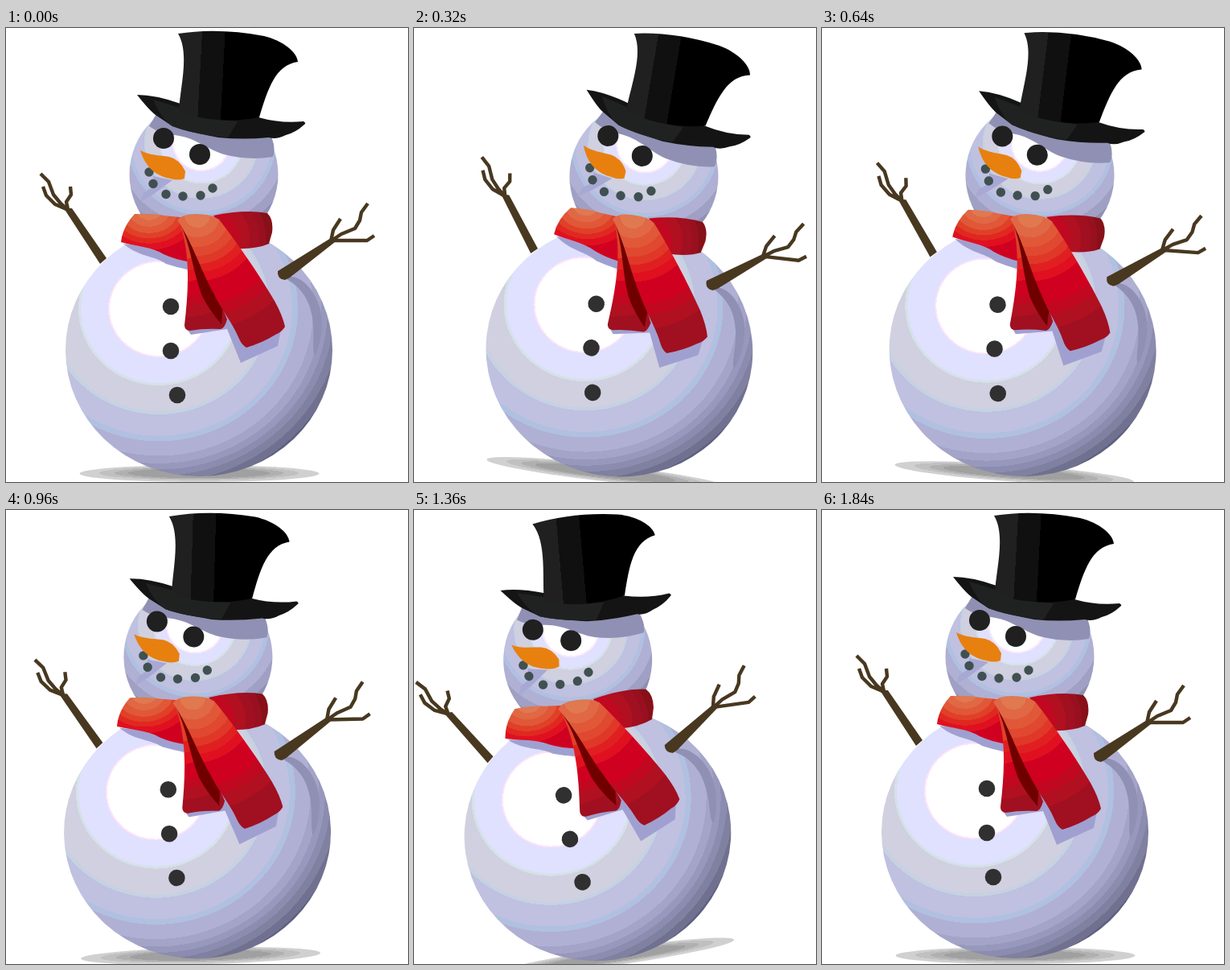
Write an HTML page that moves like this. It is 500 px wide and 564 px high and loops after 1.92 s.

```html
<!DOCTYPE html>
<html lang="en">
<head>
<meta charset="utf-8">
<title>Rocking snowman</title>
<style>
html, body { margin: 0; width: 100%; height: 100%; overflow: hidden; background: #fff; }
svg { display: block; width: 500px; height: 564px; }
.twig { fill: none; stroke: #483820; stroke-width: 4.4; stroke-linejoin: round; }
</style>
</head>
<body>
<svg viewBox="0 0 500 564">
  <defs id="defs">
    <linearGradient id="felt" gradientUnits="userSpaceOnUse" x1="213" y1="50" x2="363" y2="58">
      <stop offset=".19" stop-color="#202020"/><stop offset=".19" stop-color="#101010"/>
      <stop offset=".38" stop-color="#101010"/><stop offset=".38" stop-color="#000"/>
    </linearGradient>
  </defs>
  <g id="snowman">
    <ellipse cx="240.500" cy="553.500" rx="149" ry="10.500" fill="url(#ground)"/>

    <g id="body">
      <ellipse cx="240" cy="400" rx="166" ry="157" fill="url(#snow)"/>
      <path fill="#9090b4" d="M345 310C362 303 384 322 391 350C395 372 391 395 384 407C380 400 385 375 380 355C376 333 362 318 345 310Z"/>
      <path fill="#a0a0d0" d="M146 268C166 285 183 282 199 293Q211 297 226 300L240 280ZM222 370L230 381L275 374L292 416L338 395L342 374L270 340Z"/>
    </g>

    <g id="arms" fill="#483820">
      <path d="M117 293L125 286L82 224L72 224Z"/>
      <path class="twig" d="M77 226L68 218L59 207L53 191L43 181M75 225L61 219L50 208L46 197M77 225L75 216L81 207L80 197"/>
      <path d="M338 302Q337 312 347 313L353 310L409 266L404 261Z"/>
      <path class="twig" d="M404 265L407 251L416 237M405 264L417 256L434 249L440 239L442 229L450 218M406 264L449 264L458 258"/>
    </g>

    <g id="head">
      <circle cx="246" cy="182" r="92.500" fill="url(#face)"/>
      <path fill="#9090b4" d="M188 105L178 122Q190 131 210 133C236 136 250 151 271 157Q302 165 332 160Q336 150 330 135Z"/>
      <path fill="#a8a8d4" d="M183 184L207 189L184 206L167 216L171 205L183 197Z"/>
      <g id="coal"></g>
      <path fill="#e88010" d="M167 152C178 158 190 158 203 160Q216 163 223 178L222 187Q214 190 204 187C184 183 173 171 167 152Z"/>
    </g>

    <g id="hat">
      <path fill="#141414" d="M163 83Q186 83 217 94L314 111Q342 119 370 116Q374 118 371 120Q360 130 348 133Q336 139 327 136Q294 139 264 136Q226 129 207 122L186 108Q178 102 163 83Z"/>
      <path fill="#202222" d="M183 89L216 99Q236 111 288 116L276 136Q232 132 207 122Q193 113 183 89Z"/>
      <path fill="url(#felt)" d="M214 7Q264-1 321 10C345 16 362 30 363 42C335 46 326 75 315 111Q262 121 215 104C216 76 229 32 214 7Z"/>
    </g>

    <g id="scarf">
      <path fill="url(#wrap)" d="M258 233Q296 225 325 230Q333 238 331 254L327 268Q311 275 285 274Z"/>
      <path fill="url(#collar)" d="M160 231Q183 230 197 233L226 236L231 291Q211 288 196 281C182 272 160 271 143 266Q145 247 160 231Z"/>
      <path fill="url(#under)" d="M215 240L234 262L275 362Q272 373 267 374Q246 373 229 376Q222 376 222 369C227 326 230 280 215 240Z"/>
      <path fill="#700000" d="M213 238C229 261 231 300 244 333Q253 351 268 368L270 338L238 264Z"/>
      <path fill="url(#tail)" d="M213 239Q219 231 236 231Q256 231 265 238C285 263 316 308 334 339Q344 357 347 371Q343 378 335 381Q319 391 299 397Q293 394 289 384C281 365 267 349 258 329C243 303 230 262 213 239Z"/>
    </g>
  </g>
</svg>
<script>
const FRAME = 80, FRAMES = 24, LEAN = 8.1;
const byId = id => document.getElementById(id);

// Concentric flat rings: each pair is an outer radius and its colour.
function rings(id, cx, cy, squash, pairs) {
  const max = pairs[pairs.length - 1][0];
  let inner = 0, stops = "";
  for (const [radius, color] of pairs) {
    for (const edge of [inner, radius])
      stops += `<stop offset="${edge / max}" stop-color="${color}"/>`;
    inner = radius;
  }
  byId("defs").insertAdjacentHTML("beforeend",
    `<radialGradient id="${id}" gradientUnits="userSpaceOnUse" cx="0" cy="0" r="${max}"
      gradientTransform="translate(${cx} ${cy}) scale(1 ${squash})">${stops}</radialGradient>`);
}

rings("ground", 240, 553, 0.07, [[88, "#a0a0a0"], [105, "#b0b0b0"], [124, "#c0c0c0"], [150, "#d0d0d0"]]);
rings("snow", 190, 349, 0.95, [
  [61, "#fff"], [63, "#ffe4f8"], [97, "#e0e0ff"], [100, "#d4e2e6"], [134, "#d0d0e0"],
  [138, "#c4d2e2"], [166, "#c0c0e0"], [173, "#b0c0e0"], [192, "#b0b0d4"], [202, "#a4a4c8"],
  [210, "#9898bc"], [218, "#8c8cb0"], [227, "#8080a0"], [236, "#707090"], [250, "#606080"]]);
rings("face", 243, 143, 0.97, [
  [34, "#fff"], [36, "#ffe8fc"], [50, "#e0e0ff"], [52, "#d4e2e6"], [69, "#d0d0e0"],
  [71, "#c4d2e2"], [87, "#c0c0e0"], [92, "#b0c0e0"], [105, "#b0b0d4"], [116, "#a0a0c4"],
  [140, "#9090b4"]]);
rings("collar", 178, 226, 0.8, [
  [16, "#e07850"], [26, "#e06844"], [36, "#e05838"], [44, "#e04028"], [52, "#e02820"],
  [62, "#e01020"], [90, "#d00020"]]);
rings("tail", 238, 232, 1, [
  [16, "#e07850"], [28, "#e06844"], [40, "#e05838"], [51, "#e04830"], [61, "#e03828"],
  [71, "#e02020"], [82, "#e01020"], [112, "#d00020"], [126, "#c00820"], [143, "#b01020"],
  [190, "#a01020"]]);
rings("under", 215, 240, 1, [
  [48, "#e04028"], [62, "#e02020"], [76, "#e01020"], [94, "#d00020"], [106, "#c00820"],
  [120, "#b01020"], [160, "#a01020"]]);
rings("wrap", 258, 260, 1, [
  [20, "#d00020"], [32, "#c00820"], [45, "#b01020"], [57, "#a01020"], [65, "#981020"], [90, "#881018"]]);

function dots(parent, color, r, points) {
  byId(parent).insertAdjacentHTML("beforeend", points.map(([x, y]) =>
    `<circle cx="${x}" cy="${y}" r="${r}" fill="${color}"/>`).join(""));
}
dots("coal", "#202020", 13, [[196, 137], [241, 157]]);
dots("coal", "#405050", 5.7, [[178, 179], [183, 193.5], [199, 206.5], [220, 209], [242, 208], [257, 199]]);
dots("body", "#303030", 10.3, [[205, 346], [205, 401], [213, 456]]);

// Lean in degrees: right with a short hold, back, then left and back.
const poses = [[0, 0], [5, LEAN], [6, LEAN], [10, 0], [11, 0], [17, -LEAN], [23, 0], [24, 0]];

function leanAt(frame) {
  const next = poses.findIndex(([at]) => at > frame);
  const [from, a] = poses[next - 1], [to, b] = poses[next];
  return a + (b - a) * (frame - from) / (to - from);
}

function draw() {
  const angle = leanAt(Math.floor(performance.now() / FRAME) % FRAMES);
  const pivot = angle > 0 ? "245 536" : "255 483";
  byId("snowman").setAttribute("transform", `rotate(${angle} ${pivot})`);
  requestAnimationFrame(draw);
}
draw();
</script>
</body>
</html>
```
